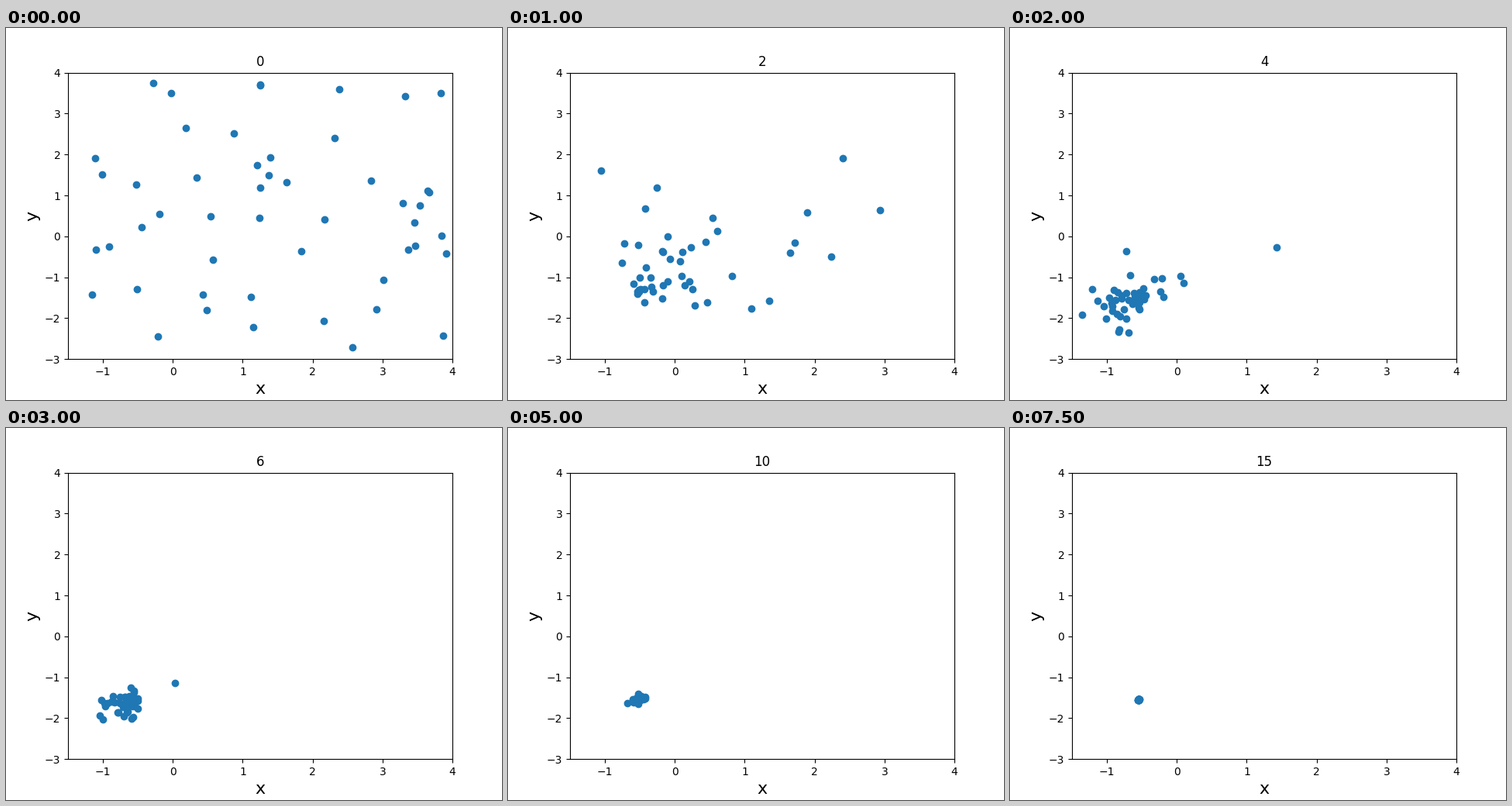
Recreate the animation shown at these times as a matplotlib script. Size 640 by 480 pixels, loop 8 s.

```python
import matplotlib.pyplot as plt
import numpy as np
from matplotlib.animation import FuncAnimation

STEPS = 16
N = 50
INERTIA = 0.4
MAX_PULL = 0.6
LOW, HIGH = np.array([-1.5, -3.0]), np.array([4.0, 4.0])
LEADER = np.array([-0.51, -1.29])   # best particle of the opening swarm
BEST = np.array([-0.547, -1.547])   # minimum of the McCormick function


def swarm_path(seed):
    """Particle swarm: inertia plus a random pull to the best known spot."""
    rng = np.random.default_rng(seed)
    pos = rng.uniform(LOW, HIGH, (N, 2))
    pos[0] = LEADER
    vel = np.zeros_like(pos)
    path = [pos]
    for k in range(STEPS - 1):
        goal = BEST + (LEADER - BEST) * 0.6 ** k
        pull = rng.uniform(0, MAX_PULL, (N, 1))
        vel = INERTIA * vel + pull * (goal - pos)
        pos = pos + vel
        path.append(pos)
    return path


path = swarm_path(seed=4)

plt.rcParams["font.family"] = "DejaVu Sans"
fig, ax = plt.subplots(figsize=(6.4, 4.8), dpi=100)
ax.set(xlim=(LOW[0], HIGH[0]), ylim=(LOW[1], HIGH[1]))
ax.set_xlabel("x", fontsize=16)
ax.set_ylabel("y", fontsize=16)
dots = ax.scatter(*path[0].T, color="tab:blue")
title = ax.set_title("0")


def update(k):
    dots.set_offsets(path[k])
    title.set_text(str(k))
    return dots, title


anim = FuncAnimation(fig, update, frames=STEPS, interval=500, repeat=True,
                     repeat_delay=0)
plt.show()
```
